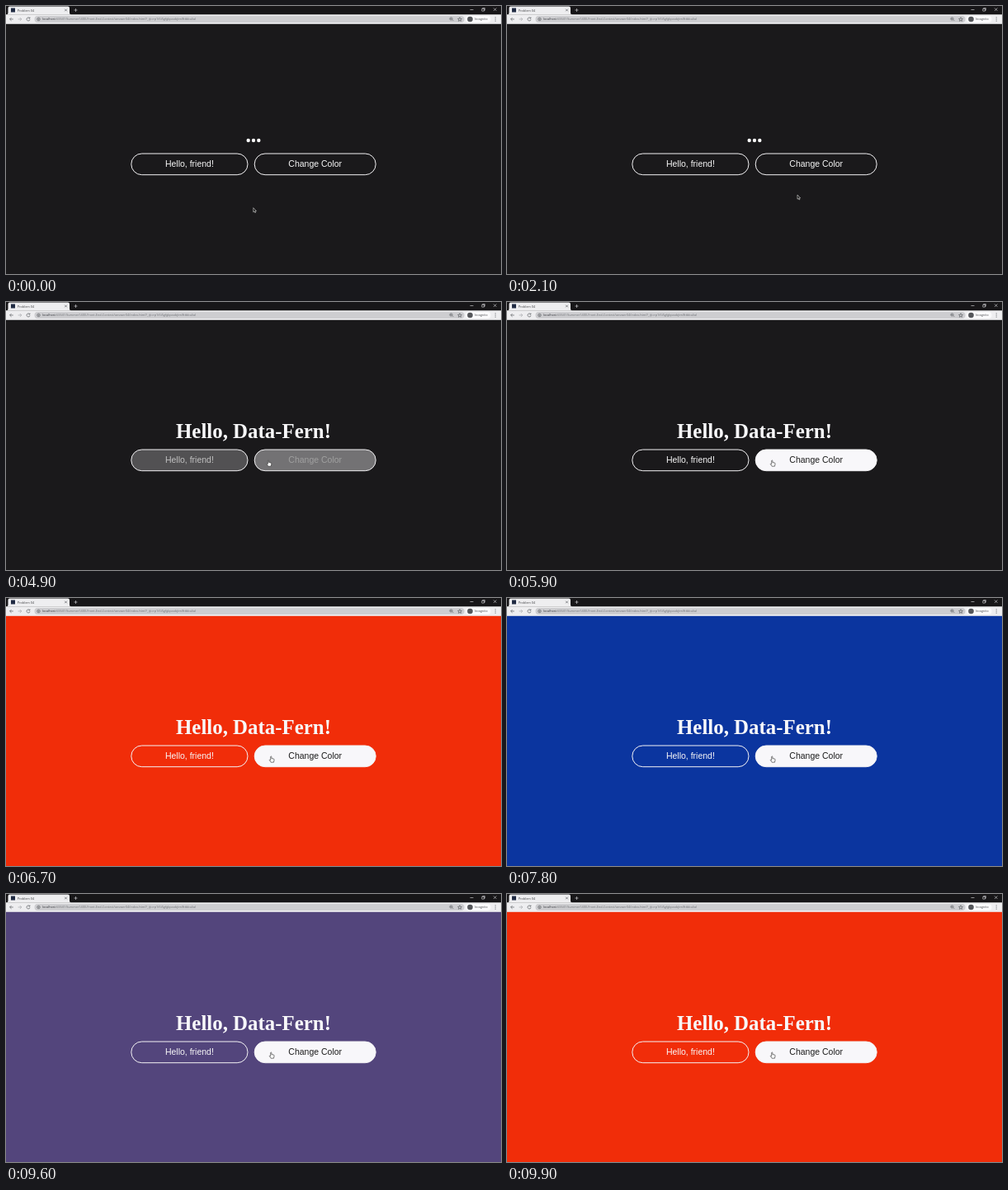
These frames come from a looping animation (600 by 325 pixels, 10 s). An HTML page:

```html
<!DOCTYPE html>
<html lang="en">
<head>
<meta charset="utf-8">
<title>Problem 04</title>
<style>
  html, body { margin: 0; width: 100%; height: 100%; overflow: hidden; background: #1a191b; }
  svg { display: block; width: 600px; height: 325px; }
  .ui { font-family: "Open Sans", sans-serif; }
  .label { font: 10.5px "Liberation Sans", Arial, sans-serif; text-anchor: middle; }
  .title { font: bold 24.9px "Liberation Serif", "Times New Roman", serif; text-anchor: middle; fill: #f8f8fa; }
  .line { fill: none; stroke: #5a5c60; stroke-width: .7; }
  .pill { fill: #f8f7fa; stroke: #f4f3f5; stroke-width: 1; }
  .cursor { fill: #fff; stroke: #222; stroke-width: .6; stroke-linejoin: round; }
</style>
</head>
<body>
<svg viewBox="0 0 600 325">
  <rect id="page" width="600" height="325"/>

  <g class="ui">
    <rect width="600" height="11" fill="#171618"/>
    <path d="M0 10.5Q2.5 10.5 2.5 8V2.500Q2.500 .5 4.500 .5H75Q77 .5 77 2.500V8Q77 10.500 79.500 10.500Z" fill="#eeeef0"/>
    <rect y="10.300" width="600" height="11.500" fill="#eeeef0"/>
    <rect x="6" y="2.500" width="5" height="5" fill="#1f2a42"/>
    <text x="13.800" y="6.500" font-size="3.800" fill="#3c3d40">Problem 04</text>
    <path class="line" d="M71.200 3.700l2.600 2.600m0-2.600l-2.600 2.600"/>
    <path class="line" style="stroke:#c4c4c8" d="M82.500 5h4m-2-2v4M562.500 4.500h4M576.800 3.400h2.700v2.700h-2.700zM577.700 3.400v-.9h2.700v2.700h-.9M591 2.500l3.400 3.400m0-3.400l-3.400 3.400"/>

    <path class="line" d="M8.800 16H4.600m1.900-1.900L4.600 16l1.900 1.900"/>
    <path class="line" style="stroke:#a5a6aa" d="M14.600 16h4.200m-1.900-1.900l1.900 1.900-1.900 1.900"/>
    <path class="line" d="M28.600 14.700A2 2 0 1 0 29 16.300M28.900 13.500v1.500h-1.500"/>
    <rect x="34.500" y="12" width="521" height="8" rx="4" fill="#cdcdd0"/>
    <circle class="line" cx="39.500" cy="16" r="1.700" stroke-width=".5"/>
    <path class="line" d="M39.500 15.800v1.100m0-2v.4"/>
    <text x="44" y="17.400" font-size="3.800" fill="#707276"><tspan fill="#35363a">localhost</tspan>:63341/Summer1400-Front-End-Contest/answer04/index.html?_ijt=rp1t5i5gfgkpaobjtm8ttbbulial</text>
    <path class="line" d="M541 16.600l1.300 1.300M538.500 15.500h1.700"/>
    <circle class="line" cx="539.500" cy="15.500" r="1.600"/>
    <path class="line" d="M550 13.700l.7 1.600 1.700.2-1.300 1.100.4 1.700-1.500-.9-1.500.9.4-1.700-1.300-1.100 1.700-.2z"/>
    <rect x="557" y="12" width="30.500" height="8" rx="4" fill="#fbfbfc"/>
    <circle cx="562.500" cy="16" r="3.300" fill="#55575b"/>
    <text x="568" y="17.300" font-size="3.600" fill="#45464a">Incognito</text>
    <path d="M593.200 13.900v.1m0 2v.1m0 2v.1" stroke="#55575b" stroke-width="1" stroke-linecap="round"/>
  </g>

  <g id="dots" fill="#fafafa">
    <circle cx="293.700" cy="163" r="2.200"/>
    <circle cx="300" cy="163" r="2.200"/>
    <circle cx="306.300" cy="163" r="2.200"/>
  </g>
  <text id="title" class="title" x="300" y="165">Hello, Data-Fern!</text>

  <g id="hello">
    <rect class="pill" x="151.800" y="179" width="141.200" height="25.700" rx="12.850"/>
    <text class="label" x="222.400" y="195.200">Hello, friend!</text>
  </g>
  <g id="change">
    <rect class="pill" x="301.200" y="179" width="147" height="25.700" rx="12.850"/>
    <text class="label" x="374.700" y="195.200">Change Color</text>
  </g>

  <path id="arrow" class="cursor" style="fill:#161616;stroke:#d8d8d8" d="M0 0V5.200L1.200 4.200L2 6L2.900 5.600L2.100 3.900H3.700Z"/>
  <path id="hand" class="cursor" d="M-.6 .7Q0-.2.6 .7V2.900L2.900 3.300Q3.900 3.500 3.800 4.500L3.200 7.500H-.2L-2 4.800Q-1.800 3.900-.6 4.800Z"/>
</svg>
<script>
const LOOP = 10000, STEP = 100;
const $ = id => document.getElementById(id);

// Rows of [time, ...values]
const path = [
  [1900, 299.8, 244.7], [2000, 326, 239], [2100, 352, 229], [2200, 360, 217],
  [2300, 320, 209], [2400, 284, 201], [2500, 271, 194], [2600, 268.8, 191],
  [4500, 268.8, 191], [4600, 274, 191], [4700, 289, 191], [4800, 308, 191.4],
  [4900, 318, 191.7], [5000, 321.3, 191.7]
];
const helloHover = [[2300, 0], [2700, 1], [4600, 1], [5000, 0]];
const changeHover = [[4700, 0], [5200, 1]];
const pageColors = [
  [0, "#1a191b"], [6000, "#f12d09"], [7800, "#0b359f"], [9600, "#53457c"], [9700, "#f12d09"]
];

const mix = (a, b, k) => a + (b - a) * k;

function track(rows, t) {
  const next = rows.findIndex(r => r[0] > t);
  if (next === 0) return rows[0].slice(1);
  if (next < 0) return rows[rows.length - 1].slice(1);
  const a = rows[next - 1], b = rows[next];
  const k = (t - a[0]) / (b[0] - a[0]);
  return a.slice(1).map((v, i) => mix(v, b[i + 1], k));
}

const show = (id, on) => $(id).setAttribute("visibility", on ? "visible" : "hidden");

function paintButton(id, hover) {
  const [pill, label] = $(id).children;
  const shade = Math.round(mix(248, 28, hover));
  pill.style.fillOpacity = hover;
  label.style.fill = `rgb(${shade},${shade},${shade})`;
}

function draw(t) {
  $("page").setAttribute("fill", pageColors.filter(r => r[0] <= t).pop()[1]);
  show("dots", t < 3600);
  show("title", t >= 3600);
  paintButton("hello", track(helloHover, t)[0]);
  paintButton("change", track(changeHover, t)[0]);

  const [x, y] = track(path, t);
  const over = y < 205 && (x < 293 || x > 301);
  for (const id of ["arrow", "hand"]) $(id).setAttribute("transform", `translate(${x} ${y})`);
  show("arrow", !over);
  show("hand", over);
}

function tick() {
  const t = performance.now() % LOOP;
  draw(Math.floor(t / STEP) * STEP);
  requestAnimationFrame(tick);
}
tick();
</script>
</body>
</html>
```
